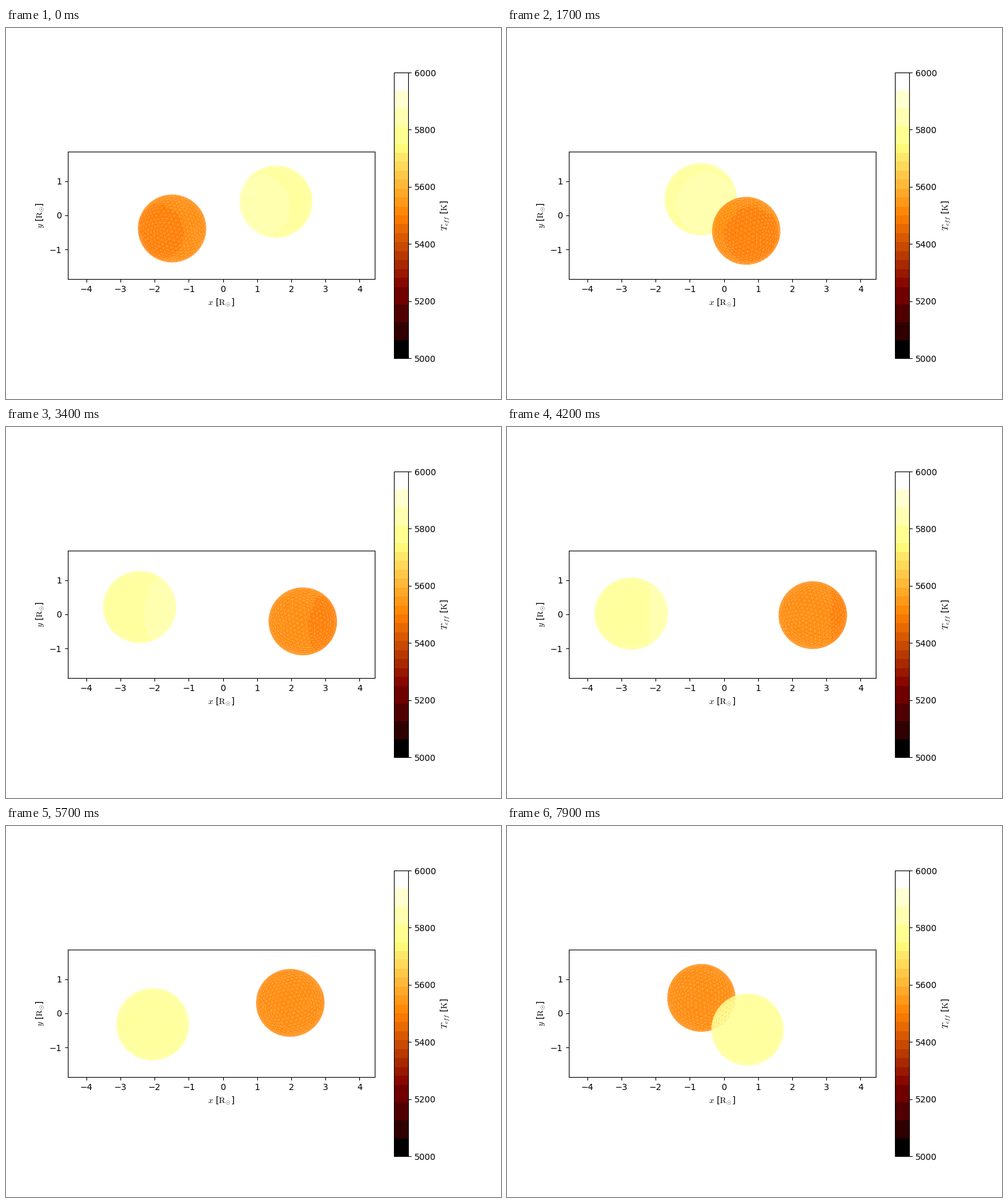
Recreate the animation shown at these times as a matplotlib script. Size 800 px wide and 600 px high, loop 8000 ms.

```python
import itertools

import matplotlib.pyplot as plt
import numpy as np
from matplotlib.animation import FuncAnimation
from matplotlib.cm import ScalarMappable
from matplotlib.collections import PolyCollection
from matplotlib.colors import ListedColormap, Normalize, to_rgba

plt.rcParams["mathtext.fontset"] = "cm"

FRAMES = 80
INTERVAL = 100
START = -0.609       # orbital phase at t = 0, rad
STEP = 0.05073       # phase per frame, rad
TILT = np.arcsin(0.18)


def geodesic(n):
    """Unit sphere as an array of triangles, shape (20 n^2, 3, 3)."""
    phi = (1 + 5 ** 0.5) / 2
    corners = np.array([np.roll((0, a, b * phi), k) for k in range(3)
                        for a in (-1, 1) for b in (-1, 1)])
    tris = []
    for face in itertools.combinations(corners, 3):
        if any(np.linalg.norm(p - q) > 2.01
               for p, q in itertools.combinations(face, 2)):
            continue
        a, b, c = face

        def point(i, j):
            return a + (b - a) * i / n + (c - a) * j / n

        for i in range(n):
            for j in range(n - i):
                tris.append((point(i, j), point(i + 1, j), point(i, j + 1)))
                if i + j < n - 1:
                    tris.append((point(i + 1, j), point(i + 1, j + 1),
                                 point(i, j + 1)))
    tris = np.array(tris)
    return tris / np.linalg.norm(tris, axis=2, keepdims=True)


def turn_y(p, angle):
    c, s = np.cos(angle), np.sin(angle)
    x, y, z = np.moveaxis(p, -1, 0)
    return np.stack((x * c + z * s, y, z * c - x * s), axis=-1)


def turn_x(p, angle):
    c, s = np.cos(angle), np.sin(angle)
    x, y, z = np.moveaxis(p, -1, 0)
    return np.stack((x, y * c - z * s, y * s + z * c), axis=-1)


class Star:
    """Mesh in a co-rotating frame whose z axis points away from the partner."""

    def __init__(self, radii, orbit, phase, edge, near, far, spin):
        unit = turn_x(turn_y(geodesic(9), spin), 0.4)
        self.mesh = unit * radii
        self.orbit = np.array((0, 0, orbit))
        self.phase = phase
        away = unit.mean(axis=1)[:, 2] > edge
        self.colors = np.where(away[:, None], to_rgba(far), to_rgba(near))

    def view(self, theta):
        """Depth, visible triangles and their colours."""
        def place(p):
            return turn_x(turn_y(p, theta + self.phase), TILT)

        tris, center = place(self.mesh), place(self.orbit)
        normal = np.cross(tris[:, 1] - tris[:, 0], tris[:, 2] - tris[:, 0])
        outward = np.sign((normal * tris.mean(axis=1)).sum(axis=1))
        front = normal[:, 2] * outward > 0
        return center[2], (tris[front] + center)[:, :, :2], self.colors[front]


stars = [
    Star((1.0, 0.995, 1.005), 2.603, 0, 0.58, "#ff8a0a", "#ff7d00", 0.3),
    Star((1.06, 1.056, 1.078), 2.715, np.pi, -0.53, "#ffffaa", "#ffff98", 0.9),
]


def heat_map():
    """32 steps of heat colours, merged in pairs in the outer quarters."""
    bins = np.arange(32)
    pairs = (bins < 8) | (bins >= 24)
    mid = np.where(pairs, bins // 2 * 2 + 1, bins + 0.5) / 32
    colors = plt.get_cmap("afmhot")(mid)
    colors[:2, :3] = 0
    colors[-2:, :3] = 1
    return ListedColormap(colors)


fig, ax = plt.subplots(figsize=(8, 6), dpi=100)
bar = fig.colorbar(ScalarMappable(Normalize(5000, 6000), heat_map()), ax=ax)
bar.set_ticks(range(5000, 6001, 200))
bar.set_label(r"$T_{eff}$ [$\mathrm{K}$]")

ax.set_aspect("equal")
ax.set_xlim(-4.54, 4.445)
ax.set_ylim(-1.866, 1.866)
ax.set_xticks(range(-4, 5))
ax.set_yticks((-1, 0, 1))
ax.set_xlabel(r"$x$ [$\mathrm{R_{\odot}}$]")
ax.set_ylabel(r"$y$ [$\mathrm{R_{\odot}}$]")

surface = PolyCollection([], linewidths=0, edgecolors="none")
ax.add_collection(surface, autolim=False)


def update(i):
    views = sorted((s.view(START + STEP * i) for s in stars),
                   key=lambda v: v[0])
    surface.set_verts(np.concatenate([v[1] for v in views]))
    surface.set_facecolor(np.concatenate([v[2] for v in views]))
    return [surface]


anim = FuncAnimation(fig, update, frames=FRAMES, interval=INTERVAL,
                     repeat=True, repeat_delay=0)
plt.show()
```
